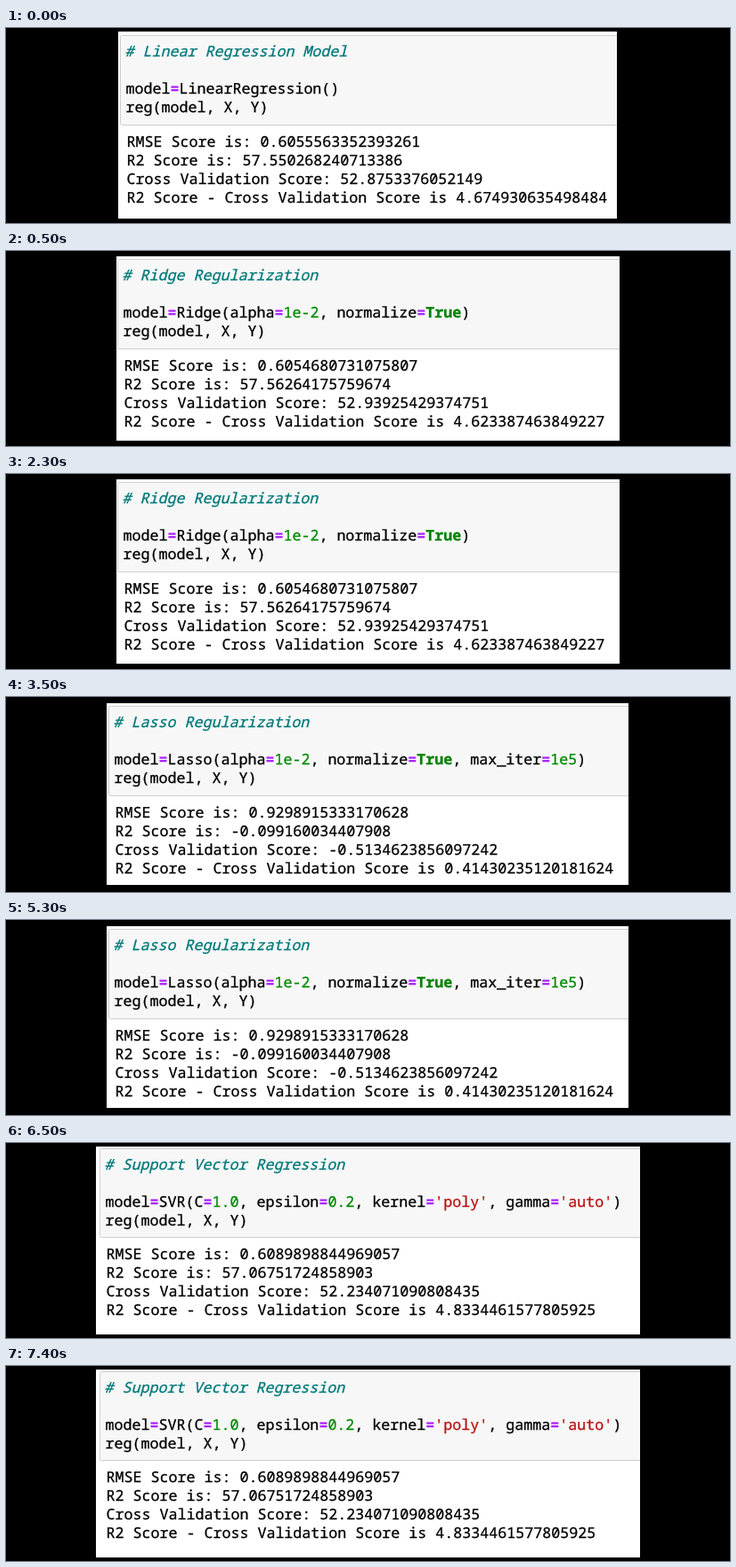
An HTML page for the animation above (8000 ms loop, 813x220 px).

```html
<!DOCTYPE html>
<html lang="en">
<head>
<meta charset="utf-8">
<title>Regression models</title>
<style>
html, body { margin: 0; width: 100%; height: 100%; overflow: hidden; background: #000; }
svg { display: block; width: 813px; height: 220px; }
text {
  font: 16.67px "Noto Sans Mono", "DejaVu Sans Mono", monospace;
  font-variant-ligatures: none;
  text-rendering: geometricPrecision;
  white-space: pre;
  color: #000;
}
text, tspan { fill: currentColor; stroke: currentColor; stroke-width: .3px; }
.comment { color: #007979; font-style: italic; }
.op { color: #a2f; font-weight: 700; }
.num { color: #080; }
.key { color: #008000; font-weight: 700; }
.str { color: #b81414; }
</style>
</head>
<body>
<svg id="stage" viewBox="0 0 813 220"></svg>
<script>
const NS = 'http://www.w3.org/2000/svg';
const stage = document.getElementById('stage');
const LOOP = 8000;

// panel: left, top, right, bottom; box: left, top, bottom; x, y: origin of the code
const slides = [
  { start: 0, panel: [126, 4, 686, 215], box: [128.5, 8.5, 109.5], x: 134.5, y: 32,
    title: 'Linear Regression Model',
    code: 'model=LinearRegression()',
    scores: ['0.6055563352393261', '57.550268240713386', '52.8753376052149', '4.674930635498484'] },
  { start: 500, panel: [124, 6, 689, 214], box: [125.5, 9.5, 110.5], x: 131.5, y: 33,
    title: 'Ridge Regularization',
    code: 'model=Ridge(alpha=1e-2, normalize=True)',
    scores: ['0.6054680731075807', '57.56264175759674', '52.93925429374751', '4.623387463849227'] },
  { start: 3500, panel: [113, 7, 699, 212], box: [115.5, 10.5, 111.5], x: 121.5, y: 34,
    title: 'Lasso Regularization',
    code: 'model=Lasso(alpha=1e-2, normalize=True, max_iter=1e5)',
    scores: ['0.9298915333170628', '-0.099160034407908', '-0.5134623856097242', '0.41430235120181624'] },
  { start: 6500, panel: [101, 4, 712, 216], box: [105.5, 6.5, 106.5], x: 111.5, y: 30,
    title: 'Support Vector Regression',
    code: "model=SVR(C=1.0, epsilon=0.2, kernel='poly', gamma='auto')",
    scores: ['0.6089898844969057', '57.06751724858903', '52.234071090808435', '4.8334461577805925'] }
];
const labels = ['RMSE Score is: ', 'R2 Score is: ', 'Cross Validation Score: ',
  'R2 Score - Cross Validation Score is '];

function add(parent, name, attrs, content) {
  const node = document.createElementNS(NS, name);
  for (const key in attrs) node.setAttribute(key, attrs[key]);
  if (content) node.textContent = content;
  return parent.appendChild(node);
}

function tokenClass(token) {
  if (token === '=') return 'op';
  if (token === 'True') return 'key';
  if (token[0] === "'") return 'str';
  return /^\d/.test(token) ? 'num' : 'plain';
}

function addCode(parent, x, y, code) {
  const line = add(parent, 'text', { x, y });
  for (const token of code.match(/=|True|'[^']*'|\d+(?:\.\d+|e-?\d+)|[^=\d']+?(?==|\d|'|True|$)/g))
    add(line, 'tspan', { class: tokenClass(token) }, token);
}

function build({ panel, box, x, y, title, code, scores }) {
  const [left, top, right, bottom] = panel;
  const [boxLeft, boxTop, boxBottom] = box;
  const group = add(stage, 'g', { visibility: 'hidden' });
  add(group, 'rect', { x: left, y: top, width: right - left, height: bottom - top, fill: '#fff' });
  add(group, 'path', {
    d: `M${right} ${boxTop}H${boxLeft + 2}q-2 0 -2 2V${boxBottom - 2}q0 2 2 2H${right}`,
    fill: '#f7f7f7', stroke: '#cfcfcf'
  });
  add(group, 'text', { x: x - 1, y, class: 'comment' }, '# ' + title);
  addCode(group, x, y + 42, code);
  add(group, 'text', { x, y: y + 63 }, 'reg(model, X, Y)');
  labels.forEach((label, i) =>
    add(group, 'text', { x: x + 1, y: boxBottom + 24.5 + 21 * i }, label + scores[i]));
  return group;
}

const groups = slides.map(build);

function draw(now) {
  const t = now % LOOP;
  const current = slides.filter(s => s.start <= t).length - 1;
  groups.forEach((g, i) => g.setAttribute('visibility', i === current ? 'visible' : 'hidden'));
}

const begin = performance.now();
function tick() {
  draw(performance.now() - begin);
  requestAnimationFrame(tick);
}
tick();
</script>
</body>
</html>
```
